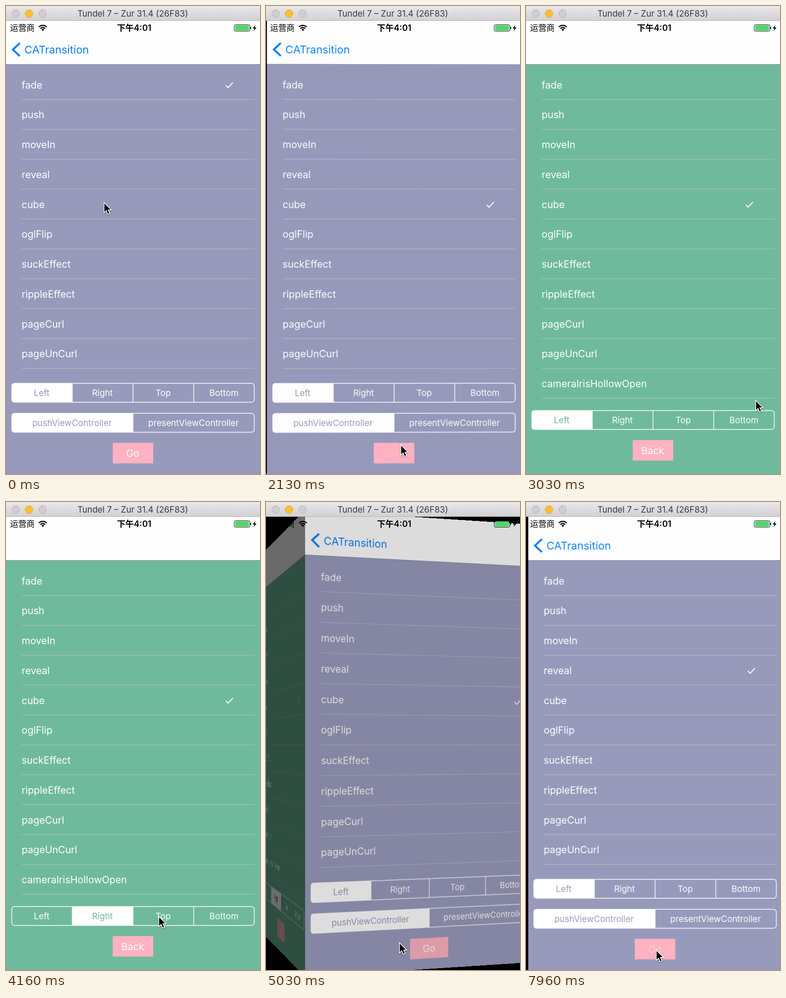
An HTML page for the animation above (8000 ms loop, 552 px wide and 1014 px high).

```html
<!DOCTYPE html>
<html lang="zh">
<head>
<meta charset="utf-8">
<title>Transition demo</title>
<style>
  html, body { margin: 0; width: 100%; height: 100%; overflow: hidden; background: #000; }
  #stage { position: absolute; left: 0; top: 0; width: 552px; height: 1014px; overflow: hidden; }
  #scene { position: absolute; left: 0; top: 32px; width: 552px; height: 982px;
           overflow: hidden; background: #000; perspective: 2295px; }
  .face { position: absolute; inset: 0; backface-visibility: hidden; }
  .face svg, #overlay { position: absolute; left: 0; top: 0; display: block; }
  .shade { position: absolute; inset: 0; background: #000; opacity: 0; }
  text { font-family: Inter, "Noto Sans CJK SC", "Noto Sans CJK JP", "Noto Sans CJK", sans-serif; }
</style>
</head>
<body>
<div id="stage">
  <div id="scene"></div>
  <svg id="overlay" width="552" height="1014">
    <defs>
      <linearGradient id="bar" x2="0" y2="1">
        <stop stop-color="#e9e7e9"/><stop offset="1" stop-color="#d2d0d2"/>
      </linearGradient>
      <filter id="shadow" x="-50%" y="-50%" width="200%" height="200%">
        <feDropShadow dx="0" dy="1.5" stdDeviation="1.3" flood-opacity=".45"/>
      </filter>
    </defs>
    <rect width="552" height="32" fill="url(#bar)"/>
    <rect y="31" width="552" height="1" fill="#b4b2b4"/>
    <g fill="#cfcdcf" stroke="#b7b5b7">
      <circle cx="21" cy="16.5" r="8.3"/>
      <circle cx="50" cy="16.5" r="8.3" fill="#fdbe2f" stroke="#dfa234"/>
      <circle cx="79.5" cy="16.5" r="8.3"/>
    </g>
    <text x="275.5" y="23" font-size="18.5" fill="#3b393b" text-anchor="middle">Tundel 7 – Zur 31.4 (26F83)</text>
    <!-- status bar -->
    <text x="9" y="54" font-size="17.7">运营商</text>
    <g fill="none" stroke="#000" stroke-width="2.4">
      <path d="M71.5 45.5a12.2 12.2 0 0 1 17 0M74.7 48.9a7.6 7.6 0 0 1 10.6 0"/>
      <path d="M80 54.2l-3-3.2a4.3 4.3 0 0 1 6 0z" fill="#000" stroke="none"/>
    </g>
    <text x="278.5" y="54" font-size="18.3" font-weight="600" text-anchor="middle">下午4:01</text>
    <rect x="496" y="40.5" width="34" height="14" rx="2.5" fill="none" stroke="#000"/>
    <rect x="498" y="42" width="30" height="11" rx="1" fill="#4bd964"/>
    <path d="M531 45q2 .5 2 2.5t-2 2.5z"/>
    <path d="M542 41l-6 7.5h4l-2 6 6.5-8h-4z"/>
    <path id="cursor" d="M0 0V22L5 17.3 8.3 25 12.4 23.2 9.1 15.8H15.8Z"
          stroke="#fff" stroke-width="1.5" filter="url(#shadow)"/>
  </svg>
</div>
<script>
const LOOP = 8000;
const ROWS = ['fade', 'push', 'moveIn', 'reveal', 'cube', 'oglFlip', 'suckEffect',
  'rippleEffect', 'pageCurl', 'pageUnCurl', 'cameraIrisHollowOpen'];
const SIDES = ['Left', 'Right', 'Top', 'Bottom'];
const ROW_STEP = 64.75;

const label = (x, y, size, str, attrs = 'fill="#fff"') =>
  `<text x="${x}" y="${y + size * .36}" font-size="${size}" ${attrs}>${str}</text>`;
const centered = 'fill="#fff" text-anchor="middle"';

function segments(names, y) {
  const w = 528 / names.length;
  return `<g class="seg"><clipPath id="clip${y}"><rect x="12" y="${y}" width="528" height="42" rx="6"/></clipPath>
    <rect class="pick" x="12" y="${y}" width="${w}" height="42" fill="#fff" clip-path="url(#clip${y})"/>
    <rect x="12.5" y="${y + .5}" width="527" height="41" rx="6" fill="none" stroke="#fff" stroke-width="1.5"/>` +
    names.map((name, i) =>
      (i ? `<path d="M${12 + w * i} ${y}v42" stroke="#fff" stroke-width="1.5"/>` : '') +
      label(12 + w * (i + .5) - .5, y + 21, 18.7, name, centered)).join('') + '</g>';
}

function makePage({ color, rows, bars, buttonY, button, back }) {
  const face = document.createElement('div');
  face.className = 'face';
  face.innerHTML = `<svg width="552" height="982" viewBox="0 32 552 982">
    <rect y="32" width="552" height="982" fill="${color}"/>
    <rect y="32" width="552" height="94" fill="#fefefe"/>
    <rect y="126" width="552" height="1" fill="#8b8c98"/>` +
    (back ? `<path d="M30 80.5L15 94.5l15 14" fill="none" stroke="#0b7ffb" stroke-width="4.2"/>` +
      label(40, 94.5, 23.5, back, 'fill="#0b7ffb"') : '') +
    ROWS.slice(0, rows).map((name, i) => label(34, 171 + ROW_STEP * i, 21.3, name) +
      `<rect x="34" y="${202 + ROW_STEP * i}" width="506" height="1" fill="#c8c7cc" opacity=".75"/>`).join('') +
    `<path class="check" d="M477.5 171.5l5 5.5 10.5-11" fill="none" stroke="#fff" stroke-width="2"/>` +
    bars.map(([names, y]) => segments(names, y)).join('') +
    `<rect x="232" y="${buttonY}" width="88" height="44.5" fill="#ffb2c2"/>` +
    label(275.5, buttonY + 22.5, 21.2, button, 'class="press" ' + centered) +
    `</svg><div class="shade"></div>`;
  document.getElementById('scene').append(face);

  const check = face.querySelector('.check'), press = face.querySelector('.press');
  const shade = face.querySelector('.shade');
  const segs = [...face.querySelectorAll('.seg')].map(g => ({
    pick: g.querySelector('.pick'), texts: [...g.querySelectorAll('text')]
  }));
  return ({ angle, row, side, fade, leaving, shift = 0 }) => {
    face.style.display = Math.abs(angle) < 90 ? '' : 'none';
    face.style.transform = angle
      ? `translateZ(-276px) rotateY(${angle}deg) translateZ(276px)`
      : shift ? `translateX(${shift}px)` : 'none';
    shade.style.opacity = Math.abs(angle) * .0079;
    check.setAttribute('transform', `translate(0 ${ROW_STEP * row})`);
    press.setAttribute('opacity', fade);
    segs.forEach(({ pick, texts }, n) => {
      const chosen = n ? 0 : side;
      pick.setAttribute('x', 12 + 528 / texts.length * chosen);
      texts.forEach((el, i) => el.setAttribute('fill', i !== chosen ? '#fff' : leaving ? '#000' : color));
    });
  };
}

const drawHome = makePage({
  color: '#989abc', rows: 10, buttonY: 946.5, button: 'Go', back: 'CATransition',
  bars: [[SIDES, 817], [['pushViewController', 'presentViewController'], 882]]
});
const drawDetail = makePage({
  color: '#6fba9d', rows: 11, buttonY: 940.5, button: 'Back', bars: [[SIDES, 876]]
});

// Pointer tip: time, x, y
const POINTER = [
  [0, 213, 426], [130, 184, 422], [830, 184, 422], [930, 277, 816],
  [1100, 277, 816], [1350, 90, 835], [1560, 320, 915], [1730, 293, 951],
  [2730, 293, 951], [2960, 525, 890], [3180, 420, 746], [3500, 218, 893],
  [3900, 218, 893], [4160, 332, 898], [4300, 334, 905], [4530, 290, 955],
  [5400, 290, 955], [5680, 323, 720], [5960, 279, 436], [6200, 280, 377],
  [6230, 280, 377], [6340, 285, 396], [6460, 294, 377],
  [6930, 294, 377], [7060, 245, 832], [7230, 245, 832], [7560, 283, 971], [LOOP, 283, 971]
];

const clamp = v => Math.min(1, Math.max(0, v));
const ramp = (t, start, length) => clamp((t - start) / length);
const smooth = u => u * u * (3 - 2 * u);

function bezier(x1, y1, x2, y2) {
  const curve = (a, b, s) => 3 * a * s * (1 - s) ** 2 + 3 * b * s * s * (1 - s) + s ** 3;
  return u => {
    if (u <= 0 || u >= 1) return clamp(u);
    let lo = 0, hi = 1;
    for (let i = 0; i < 24; i++) {
      const mid = (lo + hi) / 2;
      if (curve(x1, x2, mid) < u) lo = mid; else hi = mid;
    }
    return curve(y1, y2, lo);
  };
}
const easeInOut = bezier(.42, 0, .58, 1);
const ease = bezier(.25, .1, .25, 1);

function pointerAt(t) {
  const i = POINTER.findIndex(p => p[0] > t);
  const [t0, x0, y0] = POINTER[i - 1], [t1, x1, y1] = POINTER[i];
  const u = smooth((t - t0) / (t1 - t0));
  return [x0 + (x1 - x0) * u, y0 + (y1 - y0) * u];
}

const cursor = document.getElementById('cursor');
const pressFade = (t, start) => 1 - .9 * ramp(t, start, 90);

function draw(t) {
  const out = easeInOut(ramp(t, 2119, 228));
  const back = ease(ramp(t, 4849, 355));
  const turn = 90 * (out - back);
  drawHome({
    angle: turn, row: t < 400 ? 0 : t < 6730 ? 4 : 3, side: 0,
    fade: t < 4000 ? pressFade(t, 2030) : pressFade(t, 7900),
    leaving: t < 4000 && out > .05,
    shift: 4.5 * ramp(t, 7920, 40) ** 2
  });
  drawDetail({
    angle: turn - 90, row: 4, side: t < 3900 ? 0 : 1,
    fade: pressFade(t, 4760), leaving: back > .05
  });
  cursor.setAttribute('transform', `translate(${pointerAt(t)})`);
}

function tick() {
  draw(performance.now() % LOOP);
  requestAnimationFrame(tick);
}
tick();
</script>
</body>
</html>
```
